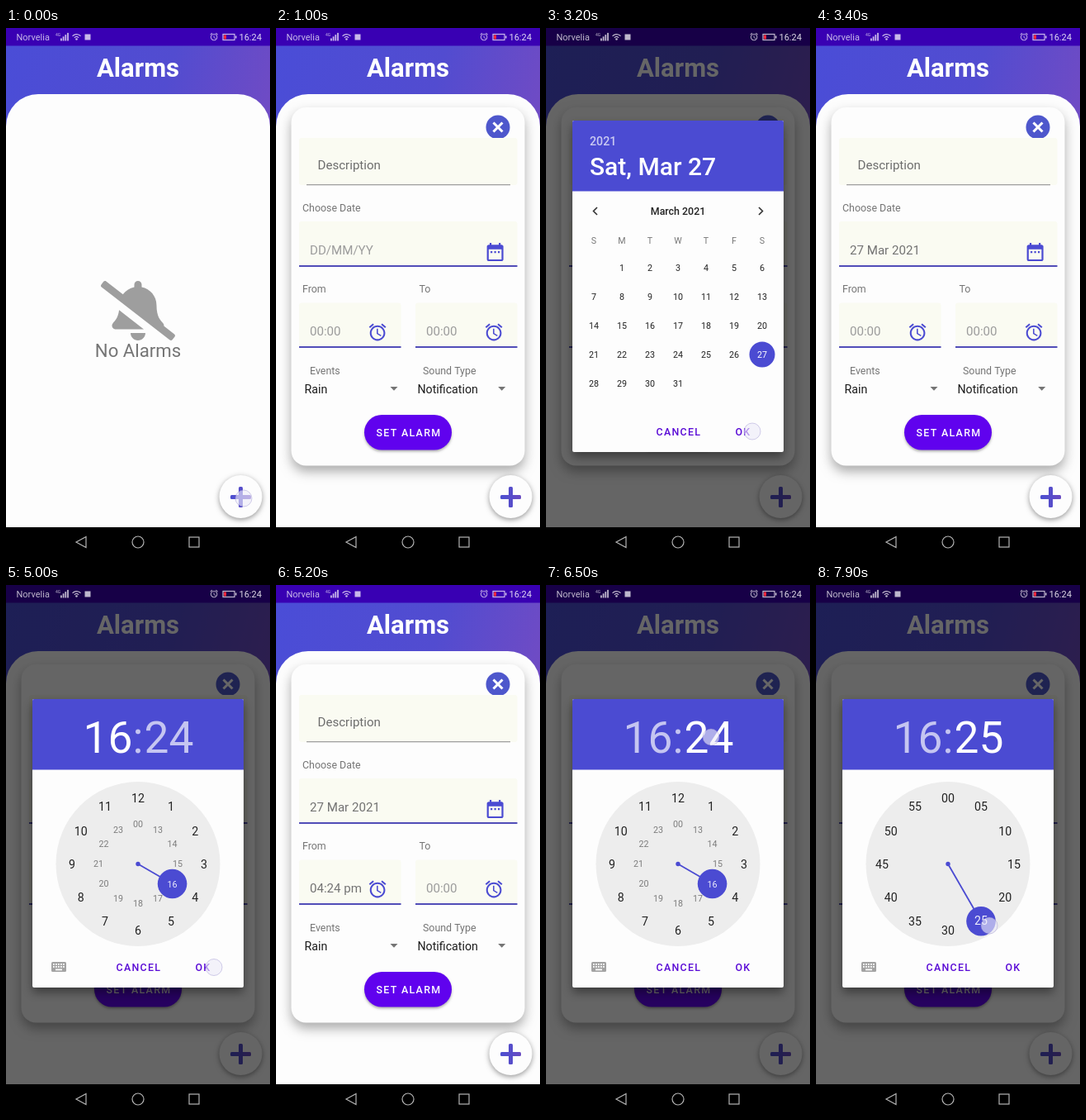
An HTML page with a canvas that plays this animation: 320 by 640 pixels, repeating every 8 s.

```html
<!DOCTYPE html>
<html lang="en">
<head>
<meta charset="utf-8">
<title>Alarms</title>
<style>
html, body { margin: 0; width: 100%; height: 100%; overflow: hidden; background: #000; }
canvas { display: block; width: 320px; height: 640px; }
</style>
</head>
<body>
<canvas id="stage"></canvas>
<script>
const LOOP = 8000, STEP = 100;
const BLUE = '#4b4bd2', ACCENT = '#5a0bd6';
const canvas = document.getElementById('stage');
const dpr = window.devicePixelRatio || 1;
canvas.width = 320 * dpr;
canvas.height = 640 * dpr;
const c = canvas.getContext('2d');

const BELL = new Path2D('M633.8 458.1l-90.6-70c.2-1.4.8-2.7.8-4.1 0-7.5-2.6-15.300-8.700-21.800-19.300-20.800-55.500-52-55.500-154.300 0-77.700-54.500-139.900-127.900-155.200V32c0-17.700-14.300-32-32-32s-32 14.300-32 32v20.800c-40.300 8.400-74.600 31.100-97.600 62.600L45.500 3.400C38.500-2 28.400-.8 23 6.200L3.400 31.500C-2 38.400-.8 48.500 6.200 53.900l588.300 454.700c7 5.400 17 4.200 22.500-2.800l19.600-25.300c5.400-7 4.200-17-2.800-22.400zM157.200 251.500c-8.600 68-36.400 93.300-52.600 110.800-6.100 6.500-8.700 14.300-8.700 21.800.1 16.400 13 32 32.100 32h242L157.200 251.500zM320 512c35.300 0 64-28.700 64-64H256c0 35.300 28.700 64 64 64z');
const CALENDAR = new Path2D('M19 4h-1V2h-2v2H8V2H6v2H5c-1.100 0-2 .9-2 2v14c0 1.100.9 2 2 2h14c1.100 0 2-.9 2-2V6c0-1.100-.9-2-2-2zm0 16H5V9h14v11zM9 11H7v2h2v-2zm4 0h-2v2h2v-2zm4 0h-2v2h2v-2z');
const CLOCK = new Path2D('M22 5.720l-4.600-3.860-1.290 1.530 4.600 3.860L22 5.720zM7.880 3.390L6.600 1.860 2 5.710l1.290 1.530 4.590-3.850zM12.500 8H11v6l4.750 2.850.75-1.230-4-2.370V8zM12 4c-4.970 0-9 4.030-9 9s4.020 9 9 9c4.970 0 9-4.030 9-9s-4.030-9-9-9zm0 16c-3.870 0-7-3.130-7-7s3.130-7 7-7 7 3.130 7 7-3.130 7-7 7z');

const ramp = (t, a, b) => Math.min(1, Math.max(0, (t - a) / (b - a)));

function text(s, x, y, size, color, o = {}) {
  c.font = `${o.weight || 400} ${size}px Roboto, sans-serif`;
  c.textAlign = o.align || 'left';
  c.letterSpacing = (o.space || 0) + 'px';
  c.fillStyle = color;
  c.fillText(s, x, y);
  c.letterSpacing = '0px';
}
function rect(x, y, w, h, color) {
  c.fillStyle = color;
  c.fillRect(x, y, w, h);
}
function round(x, y, w, h, r, color) {
  c.beginPath();
  c.roundRect(x, y, w, h, r);
  c.fillStyle = color;
  c.fill();
}
function disc(x, y, r, color) {
  c.beginPath();
  c.arc(x, y, r, 0, Math.PI * 2);
  c.fillStyle = color;
  c.fill();
}
function stroke(points, width, color, close) {
  c.beginPath();
  points.forEach(([x, y]) => c.lineTo(x, y));
  if (close) c.closePath();
  c.lineWidth = width;
  c.strokeStyle = color;
  c.stroke();
}
function icon(path, x, y, scale, color) {
  c.save();
  c.translate(x, y);
  c.scale(scale, scale);
  c.fillStyle = color;
  c.fill(path);
  c.restore();
}
function shaded(blur, dy, alpha, draw) {
  c.save();
  c.shadowColor = `rgba(0,0,0,${alpha})`;
  c.shadowBlur = blur * dpr;
  c.shadowOffsetY = dy * dpr;
  draw();
  c.restore();
}
function faded(alpha, draw) {
  if (alpha <= 0) return;
  c.save();
  c.globalAlpha *= alpha;
  draw();
  c.restore();
}

function background() {
  const g = c.createLinearGradient(0, 20, 320, 110);
  g.addColorStop(0, '#4a4dd7');
  g.addColorStop(0.6, '#524cd0');
  g.addColorStop(1, '#704bc4');
  rect(0, 0, 320, 130, g);
  rect(0, 0, 320, 21.5, '#3900b3');
  text('Alarms', 160, 59, 31.1, '#fff', { weight: 700, align: 'center' });
  round(0, 80, 320, 560, [39, 39, 0, 0], '#fdfdfd');
}

function emptyState() {
  icon(BELL, 115, 306, 0.1406, '#9e9e9e');
  text('No Alarms', 160, 398, 22.2, '#757575', { align: 'center' });
}

function fab() {
  shaded(6, 2, 0.4, () => disc(284.5, 567, 26, '#fdfdfd'));
  const g = c.createLinearGradient(272, 567, 297, 567);
  g.addColorStop(0, '#4b4fd0');
  g.addColorStop(1, '#6a4cc2');
  round(272, 565, 25, 5, 1.5, g);
  round(282, 555, 5, 25, 1.5, '#564dca');
}

function field(x, y, w, h, value, filled) {
  round(x, y, w, h, [3, 3, 0, 0], '#fafbf2');
  rect(x, y + h - 2, w, 2, '#514db8');
  text(value, x + 13, y + h - 15, 15.1, filled ? '#737373' : '#9c9c9c');
}
function spinner(label, lx, value, vx, ax) {
  text(label, lx, 418.5, 12.4, '#757575');
  text(value, vx, 441.5, 14.2, '#1d1d1d');
  c.beginPath();
  c.moveTo(ax - 4.5, 434);
  c.lineTo(ax + 4.5, 434);
  c.lineTo(ax, 438.7);
  c.fillStyle = '#757575';
  c.fill();
}
function form(t) {
  const hasDate = t >= 3200, hasFrom = t >= 5100;
  shaded(14, 7, 0.32, () => round(18.5, 96, 283, 433.5, 18, '#fdfdfd'));
  disc(269, 120, 14.5, '#4e57cc');
  c.lineCap = 'butt';
  stroke([[263.5, 114.500], [274.500, 125.500]], 3, '#fff');
  stroke([[274.500, 114.500], [263.500, 125.500]], 3, '#fff');

  round(28, 133, 264.500, 57, 3, '#fafbf2');
  rect(37, 189, 247, 1.300, '#a0a0a0');
  text('Description', 50.500, 170.500, 15.1, '#6c6c6c');
  text('Choose Date', 32, 221.500, 12.4, '#757575');
  field(28, 234, 264.500, 55, hasDate ? '27 Mar 2021' : 'DD/MM/YY', hasDate);
  icon(CALENDAR, 252.300, 257.700, 1.11, BLUE);
  text('From', 32, 320, 12.4, '#757575');
  text('To', 173.500, 320, 12.4, '#757575');
  field(28, 332.500, 123.500, 54.500, hasFrom ? '04:24 pm' : '00:00', hasFrom);
  field(169, 332.500, 123.500, 54.500, '00:00', false);
  icon(CLOCK, 110.600, 355.500, 1.04, BLUE);
  icon(CLOCK, 251.600, 355.500, 1.04, BLUE);
  spinner('Events', 41, 'Rain', 34.500, 143);
  spinner('Sound Type', 178, 'Notification', 171.500, 273.700);
  shaded(3, 2, 0.3, () => round(107, 468, 106, 42.500, 21.250, '#6002ee'));
  text('SET ALARM', 121.500, 494.300, 12.4, '#fff', { weight: 500, space: 1.3 });
}

function statusBar() {
  const ink = 'rgba(255,255,255,.72)';
  text('Norvelia', 12.500, 15, 11, ink);
  text('4G', 60, 10, 5, ink);
  for (let i = 0; i < 4; i++) rect(66 + i * 2.700, 12.500 - i * 2.200, 1.800, 3 + i * 2.200, ink);
  c.strokeStyle = ink;
  c.lineWidth = 1.200;
  for (const r of [3.400, 6.400]) {
    c.beginPath();
    c.arc(85.500, 14, r, -2.450, -0.690);
    c.stroke();
  }
  disc(85.500, 13.500, 1.300, ink);
  rect(95.500, 7.500, 7, 7, ink);
  icon(CLOCK, 246.500, 5, 0.47, ink);
  c.strokeRect(263, 7.500, 14, 7);
  rect(278, 9.500, 1.500, 3, ink);
  rect(264, 8.500, 3, 5, '#f0283c');
  text('16:24', 282.500, 15, 11, 'rgba(255,255,255,.85)');
}

function navBar() {
  rect(0, 604, 320, 36, '#000');
  stroke([[97, 615.500], [97, 628.500], [85, 622]], 1.200, '#b4b4b4', true);
  c.beginPath();
  c.arc(160, 622, 7, 0, Math.PI * 2);
  c.stroke();
  c.strokeRect(222, 616, 12, 12);
}

function panel(top, bottom) {
  shaded(12, 6, 0.4, () => round(32, top, 256, bottom - top, 2, '#fdfdfd'));
  round(32, top, 256, 85.500, [2, 2, 0, 0], BLUE);
  const button = { weight: 500, space: 1.3 };
  text('CANCEL', 133.500, bottom - 20.500, 12.4, ACCENT, button);
  text('OK', 229.500, bottom - 20.500, 12.4, ACCENT, button);
}

function datePicker() {
  const top = 112, mid = { align: 'center' };
  panel(top, 513);
  text('2021', 53, top + 30, 14.2, 'rgba(255,255,255,.7)', { weight: 500 });
  text('Sat, Mar 27', 53, top + 66, 30, '#fff', { weight: 500 });
  text('March 2021', 160, 226, 12.4, '#222', { weight: 500, align: 'center' });
  stroke([[62, 217], [57.500, 221.500], [62, 226]], 1.600, '#333');
  stroke([[258, 217], [262.500, 221.500], [258, 226]], 1.600, '#333');
  [...'SMTWTFS'].forEach((d, i) => text(d, 58 + i * 34, 261, 10.7, '#777', mid));
  for (let day = 1; day <= 31; day++) {
    const x = 58 + day % 7 * 34, y = 290 + Math.floor(day / 7) * 35;
    const on = day === 27;
    if (on) disc(x, y, 15.500, BLUE);
    text(day, x, y + 4.200, 10.7, on ? '#fff' : '#222', mid);
  }
}

const CX = 160, CY = 337.500;
const polar = (turn, r) => [CX + r * Math.sin(turn * 2 * Math.PI), CY - r * Math.cos(turn * 2 * Math.PI)];

function ring(r, size, color, label) {
  for (let i = 0; i < 12; i++) {
    const [x, y] = polar(i / 12, r);
    text(label(i), x, y + size * 0.355, size, color, { align: 'center' });
  }
}
function hand(turn, r, label, dot) {
  const [x, y] = polar(turn, r);
  stroke([[CX, CY], [x, y]], 1.800, BLUE);
  disc(CX, CY, 2.700, BLUE);
  disc(x, y, 17.800, BLUE);
  if (dot) disc(x, y, 2, '#fff');
  else text(label, x, y + 4, r < 60 ? 10.7 : 14.2, '#eeeefc', { align: 'center' });
}
const pad = n => String(n).padStart(2, '0');

function timePicker(minute, minuteOn, swap) {
  panel(138, 487);
  const dim = 'rgba(255,255,255,.68)';
  text('16', 93.500, 203, 53.3, minuteOn ? dim : '#fff');
  text(':', 160, 203, 53.3, dim, { align: 'center' });
  text(pad(minute), 167.500, 203, 53.3, minuteOn ? '#fff' : dim);
  disc(CX, CY, 99.500, '#ededed');
  faded(1 - swap, () => {
    ring(80, 14.2, '#222', i => i || 12);
    ring(48, 10.7, '#7c7c7c', i => i ? i + 12 : '00');
    hand(16 / 12, 48, '16');
  });
  faded(swap, () => {
    ring(80, 14.2, '#222', i => pad(i * 5));
    hand(minute / 60, 80, minute, minute % 5);
  });
  round(55, 456, 18, 12, 1.500, '#a3a3a3');
  for (let i = 0; i < 10; i++) rect(57 + i % 5 * 3, 458 + Math.floor(i / 5) * 3, 1.800, 1.800, '#fdfdfd');
  rect(60, 464.500, 8, 1.800, '#fdfdfd');
}

// start, end, x, y, and an optional drag offset
const touches = [
  [-300, 200, 288, 569],
  [1800, 2200, 268, 272],
  [3100, 3300, 250, 488],
  [3800, 4200, 126, 369],
  [4900, 5100, 252, 462.500],
  [5400, 5700, 267, 369],
  [6400, 6800, 200, 184],
  [7400, 8200, 214, 405, -4, 7]
];
function touch(t) {
  for (const [a, b, x, y, dx = 0, dy = 0] of touches) {
    if (t < a || t >= b) continue;
    const k = ramp(t, a, a + 400);
    const alpha = Math.min(1, (t - a + 50) / 100, (b - t) / 100);
    faded(alpha, () => {
      disc(x + dx * k, y + dy * k, 10, 'rgba(238,236,248,.62)');
      c.strokeStyle = 'rgba(140,130,200,.38)';
      c.lineWidth = 1;
      c.stroke();
    });
  }
}

function modal(alpha, draw) {
  faded(alpha, () => {
    rect(0, 0, 320, 604, 'rgba(0,0,0,.6)');
    const s = 0.94 + 0.06 * alpha;
    c.translate(160, 312.500);
    c.scale(s, s);
    c.translate(-160, -312.500);
    draw();
  });
}

function render(t) {
  c.setTransform(dpr, 0, 0, dpr, 0, 0);
  background();
  const shown = ramp(t, 100, 400);
  if (shown < 1) emptyState();
  faded(shown, () => form(t));
  fab();
  modal(ramp(t, 2500, 2900) * (1 - ramp(t, 3200, 3400)), datePicker);
  modal(ramp(t, 4300, 4600) * (1 - ramp(t, 5000, 5200)), () => timePicker(24, false, 0));
  modal(ramp(t, 5700, 6000), () => timePicker(t < 7600 ? 24 : 25, t >= 6500, ramp(t, 6500, 6900)));
  statusBar();
  navBar();
  touch(t);
}

const start = performance.now();
function tick(now) {
  const t = Math.max(0, now - start) % LOOP;
  render(Math.floor((t + 0.5) / STEP) * STEP % LOOP);
  requestAnimationFrame(tick);
}
render(0);
requestAnimationFrame(tick);
</script>
</body>
</html>
```
